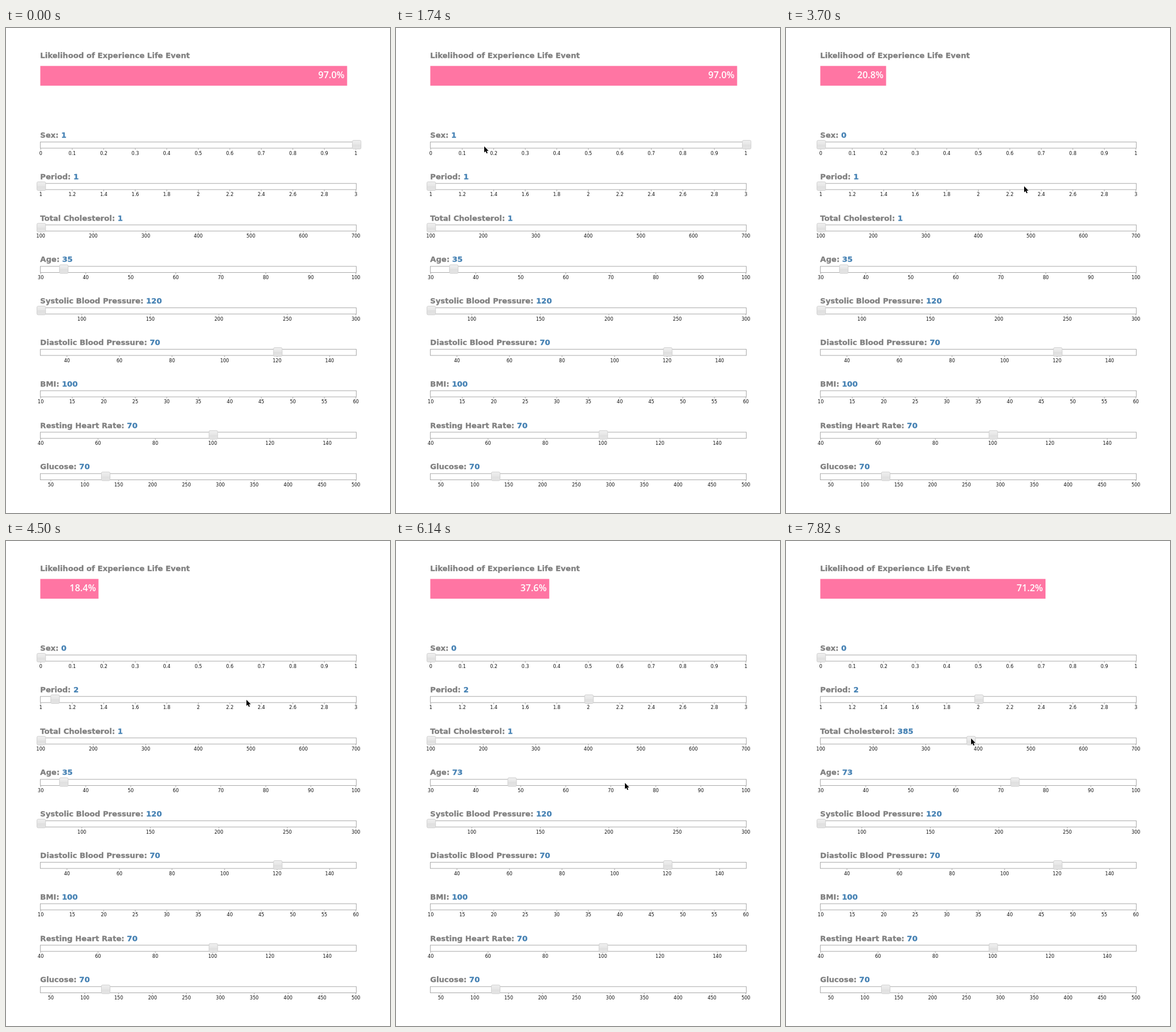
These frames come from a looping animation (666x840 px, 8 s). An HTML page:

```html
<!DOCTYPE html>
<html lang="en">
<head>
<meta charset="utf-8">
<title>Life event likelihood</title>
<style>
  html, body { margin: 0; width: 100%; height: 100%; overflow: hidden; background: #fff; }
  svg { display: block; }
  .head {
    font: bold 13.1px "DejaVu Sans", Verdana, sans-serif; white-space: pre;
    fill: #808080; stroke: #808080; stroke-width: .35px;
  }
  .value { fill: #4682b4; stroke: #4682b4; }
  .scale { font: 8px "DejaVu Sans", Verdana, sans-serif; fill: #111; text-anchor: middle; }
  .percent { font: 600 16px "Open Sans", "Noto Sans", sans-serif; fill: #fff; text-anchor: end; }
  .track { fill: #fff; stroke: #aaa; }
  .tick { stroke: #aaa; }
  .knob { fill: url(#knob); stroke: #d0d0d0; }
</style>
</head>
<body>
<svg id="stage" width="666" height="840" viewBox="0 0 666 840">
  <defs>
    <linearGradient id="knob" x1="0" y1="0" x2="0" y2="1">
      <stop offset="0" stop-color="#efefef"/>
      <stop offset=".5" stop-color="#e6e6e6"/>
      <stop offset=".5" stop-color="#e0e0e0"/>
      <stop offset="1" stop-color="#e4e4e4"/>
    </linearGradient>
  </defs>
</svg>
<script>
const LOOP = 8000, STEP = 40, PHASE = 20;
const LEFT = 60.2, SPAN = 546.6, PITCH = 71.8;
const stage = document.getElementById("stage");

const SLIDERS = [
  { label: "Sex", min: 0, max: 1, value: 1 },
  { label: "Period", min: 1, max: 3, value: 1 },
  { label: "Total Cholesterol", min: 100, max: 700, value: 1 },
  { label: "Age", min: 30, max: 100, value: 35 },
  { label: "Systolic Blood Pressure", min: 70, max: 300, value: 120, knobAt: 70 },
  { label: "Diastolic Blood Pressure", min: 30, max: 150, value: 70, knobAt: 120 },
  { label: "BMI", min: 10, max: 60, value: 100 },
  { label: "Resting Heart Rate", min: 40, max: 150, value: 70, knobAt: 100 },
  { label: "Glucose", min: 35, max: 500, value: 70, knobAt: 130 }
];

const CLICKS = [
  { time: 2620, slider: 0, value: 0, chance: 20.8 },
  { time: 4500, slider: 1, value: 2, chance: 18.4 },
  { time: 6100, slider: 3, value: 73, chance: 37.6 },
  { time: 7540, slider: 2, value: 385, chance: 71.2 }
];

// pointer strokes: start time, end time, where the tip arrives
const ENTER = 500, ENTRY = [31, 177];
const STROKES = [
  [ENTER, 1180, 597, 706],
  [1540, 1740, 153, 205],
  [1740, 2300, 62, 203],
  [2860, 3220, 62, 306],
  [3420, 3560, 210, 183],
  [3560, 3700, 413, 274],
  [3700, 4340, 417, 275],
  [5140, 5860, 397, 419],
  [6340, 6740, 333, 366],
  [6740, 7340, 321, 342]
];

const clamp = p => Math.min(1, Math.max(0, p));
const smooth = p => p * p * (3 - 2 * p);
const cubicInOut = p => p < 0.5 ? 4 * p ** 3 : 1 - 4 * (1 - p) ** 3;
const mix = (a, b, p) => a + (b - a) * p;

function add(tag, attrs, text, parent = stage) {
  const el = document.createElementNS("http://www.w3.org/2000/svg", tag);
  for (const name in attrs) el.setAttribute(name, attrs[name]);
  if (text !== undefined) el.textContent = text;
  return parent.appendChild(el);
}

// round tick values, about eight per scale
function ticks(min, max) {
  const rough = (max - min) / 8;
  const base = 10 ** Math.floor(Math.log10(rough));
  const ratio = base / rough;
  const step = base * (ratio <= 0.15 ? 10 : ratio <= 0.35 ? 5 : ratio <= 0.75 ? 2 : 1);
  const marks = [];
  for (let n = Math.ceil(min / step - 1e-6); n * step <= max + 1e-6; n++) marks.push(n * step);
  return marks;
}

function addSlider({ label, min, max, value, knobAt = Math.max(min, value) }, i) {
  const row = add("g", { transform: `translate(0 ${i * PITCH})` });
  const head = add("text", { class: "head", x: 59.3, y: 190.1 }, label + ": ", row);
  const number = add("tspan", { class: "value" }, value, head);
  for (const mark of ticks(min, max)) {
    const x = LEFT + (mark - min) / (max - min) * SPAN;
    add("line", { class: "tick", x1: x, x2: x, y1: 208, y2: 211 }, undefined, row);
    add("text", { class: "scale", x, y: 219.6 }, +mark.toFixed(1), row);
  }
  add("rect", { class: "track", x: 59.5, y: 197.4, width: 548, height: 10.7 }, undefined, row);
  const knob = knobAt > max ? null :
    add("rect", { class: "knob", y: 194.6, width: 15, height: 15, rx: 2 }, undefined, row);
  return { min, max, value, knobAt, number, knob };
}

add("text", { class: "head", x: 59.3, y: 51.6 }, "Likelihood of Experience Life Event");
const bar = add("rect", { x: 59.5, y: 65.7, height: 34.2, fill: "#ff75a3" });
const percent = add("text", { class: "percent", y: 87 });
const sliders = SLIDERS.map(addSlider);
const pointer = add("path", {
  d: "M0 0V10.6L2.5 8.4 4.1 12.2 5.9 11.4 4.3 7.7H7.6Z",
  stroke: "#fff", "stroke-width": 0.9, "paint-order": "stroke"
});

function pointerAt(t) {
  let [x, y] = ENTRY;
  for (const [start, end, toX, toY] of STROKES) {
    const p = smooth(clamp((t - start) / (end - start)));
    x = mix(x, toX, p);
    y = mix(y, toY, p);
  }
  return [x, y];
}

function draw(t) {
  const state = sliders.map(({ value, knobAt }) => ({ value, knobAt }));
  let chance = 97;
  for (const click of CLICKS) {
    if (t < click.time) break;
    const item = state[click.slider];
    item.value = click.value;
    item.knobAt = mix(item.knobAt, click.value, cubicInOut(clamp((t - click.time + 70) / 250)));
    chance = click.chance;
  }
  sliders.forEach(({ min, max, number, knob }, i) => {
    number.textContent = state[i].value;
    if (knob) knob.setAttribute("x", 53.7 + (state[i].knobAt - min) / (max - min) * 547);
  });

  const width = chance * 5.486;
  bar.setAttribute("width", width);
  percent.setAttribute("x", 55 + width);
  percent.textContent = chance.toFixed(1) + "%";

  pointer.setAttribute("visibility", t < ENTER ? "hidden" : "visible");
  pointer.setAttribute("transform", `translate(${pointerAt(t)})`);
}

const origin = performance.now();
function frame() {
  const t = (performance.now() - origin) % LOOP;
  draw(Math.floor((t - PHASE) / STEP) * STEP + PHASE);
  requestAnimationFrame(frame);
}
frame();
</script>
</body>
</html>
```
